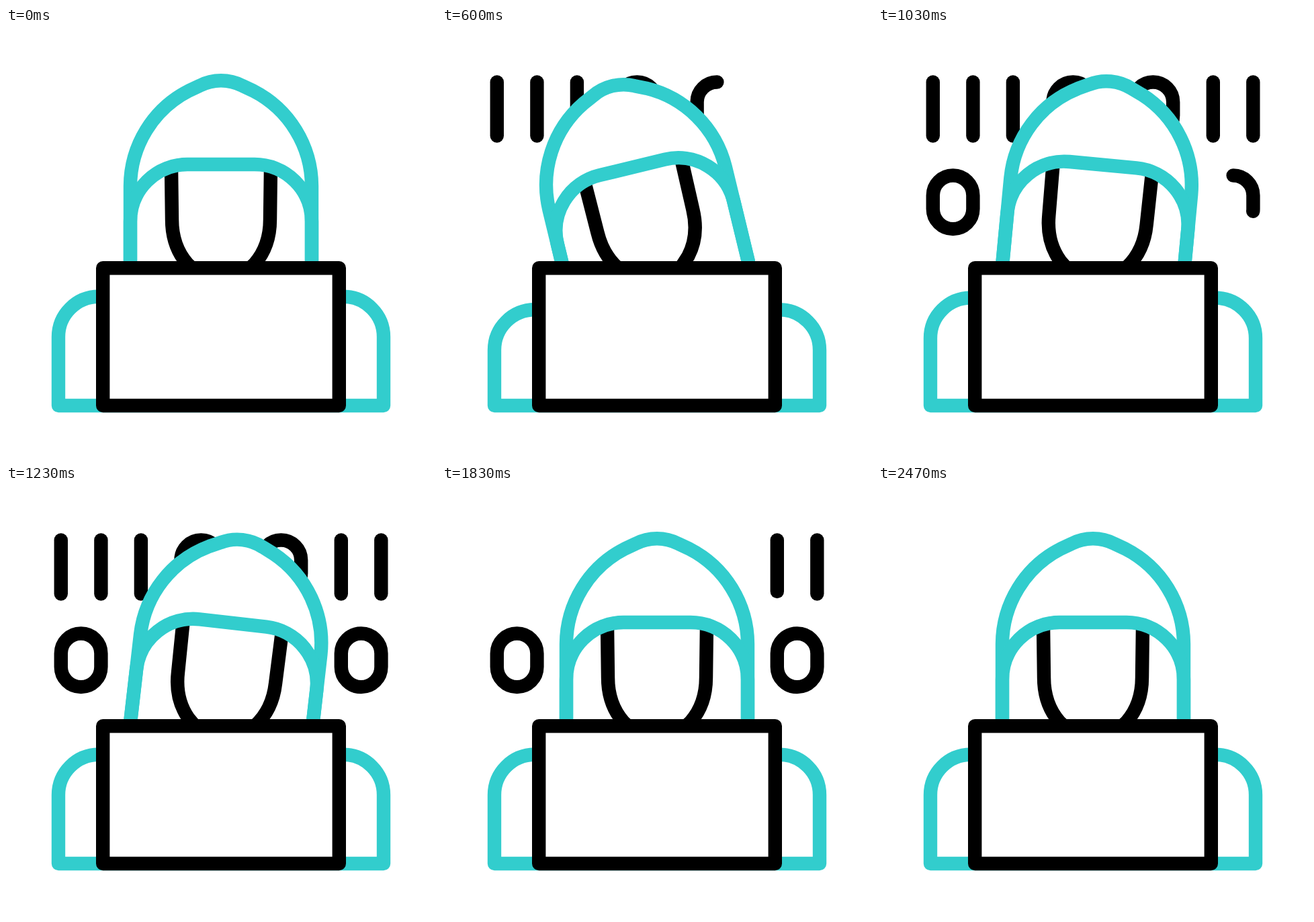
Recreate the animation shown at these times as an HTML page. Size 640 px wide and 640 px high, loop 2.5 s.

```html
<!DOCTYPE html>
<html lang="en">
<head>
<meta charset="utf-8">
<style>
  html, body { margin: 0; height: 100%; overflow: hidden; background: #fff; }
  svg { display: block; width: 100vw; height: 100vh; }
  path { fill: none; stroke: #000; stroke-width: 20.4; stroke-linecap: round; stroke-linejoin: round; }
  .teal { stroke: #32cdcd; }
  .solid { fill: #fff; }
</style>
</head>
<body>
<svg viewBox="0 0 640 640">
  <g id="digits"></g>
  <path id="body" class="teal solid"/>
  <g id="head">
    <path class="solid" style="stroke:none" d="M185 380V235A160 160 0 0 1 272 93.500L288 86A70 70 0 0 1 352 86L368 93.500A160 160 0 0 1 455 235V380Z"/>
    <path d="M246 208L247 285C247 312 256 335 270 351L290 370M394 208L393 285C393 312 384 335 370 351L350 370"/>
    <path class="teal" d="M185 380V235A160 160 0 0 1 272 93.500L288 86A70 70 0 0 1 352 86L368 93.500A160 160 0 0 1 455 235V380"/>
    <path class="teal" d="M185 380V288A85 85 0 0 1 270 203H370A85 85 0 0 1 455 288V380"/>
  </g>
  <path class="solid" d="M144.200 357.200H495.800V562H144.200Z"/>
</svg>
<script>
const FRAMES = 75;
const byId = id => document.getElementById(id);
const clamp = v => Math.min(1, Math.max(0, v));
const smooth = v => v * v * (3 - 2 * v);

// Eased value through [frame, value] keys
function tween(keys, f) {
  let value = keys[0][1];
  for (let i = 1; i < keys.length; i++) {
    const [f0, v0] = keys[i - 1], [f1, v1] = keys[i];
    if (f >= f0) value = v0 + (v1 - v0) * smooth(clamp((f - f0) / (f1 - f0)));
  }
  return value;
}

const one = (x, y) => `M${x} ${y}v80`;
// dir -1 starts to the left of the top, 1 to the right
const zero = (x, y, dir = -1) => {
  const arc = (dx, dy) => `a29.800 29.800 0 0 ${dir > 0 ? 1 : 0} ${dx * dir} ${dy}`;
  return `M${x} ${y}` + arc(29.8, 29.8) + 'v20' + arc(-29.8, 29.8) +
    arc(-29.8, -29.8) + 'v-20' + arc(29.8, -29.8);
};

const digits = [
  one(81.8, 80.5), one(141.4, 80.5), one(200.9, 80.5),
  zero(290.3, 80.5), zero(409.4, 80.5),
  one(498.8, 80.5), one(558.3, 80.5),
  zero(111.6, 219.5), zero(528.6, 219.5, 1)
].map(d => {
  const path = document.createElementNS('http://www.w3.org/2000/svg', 'path');
  path.setAttribute('d', d);
  path.setAttribute('pathLength', 1);
  return byId('digits').appendChild(path);
});

const tilt = [[0, 0], [20, -14], [34, 8], [45, 0]];
const slump = [[1, 0], [11.5, 24], [35, 0]];

function draw(f) {
  digits.forEach((path, i) => {
    const typed = clamp((f - 3.33) / 3.33 - i);
    const erased = clamp((f - 40.88) / 2.8 - i);
    const shown = typed - erased;
    path.style.display = shown > 0.001 ? '' : 'none';
    path.setAttribute('stroke-dasharray', shown < 1 ? `${shown} 2` : 'none');
  });
  byId('head').setAttribute('transform', `rotate(${tween(tilt, f)} 320 360)`);
  const top = 399.8 + tween(slump, f);
  byId('body').setAttribute('d',
    `M138 ${top}A60 60 0 0 0 78 ${top + 60}V562H562V${top + 60}A60 60 0 0 0 502 ${top}Z`);
}

const start = performance.now();
function tick() {
  const ms = (performance.now() - start) % 2500;
  draw(Math.floor(ms * 0.03 + 0.2) % FRAMES);
  requestAnimationFrame(tick);
}
tick();
</script>
</body>
</html>
```
